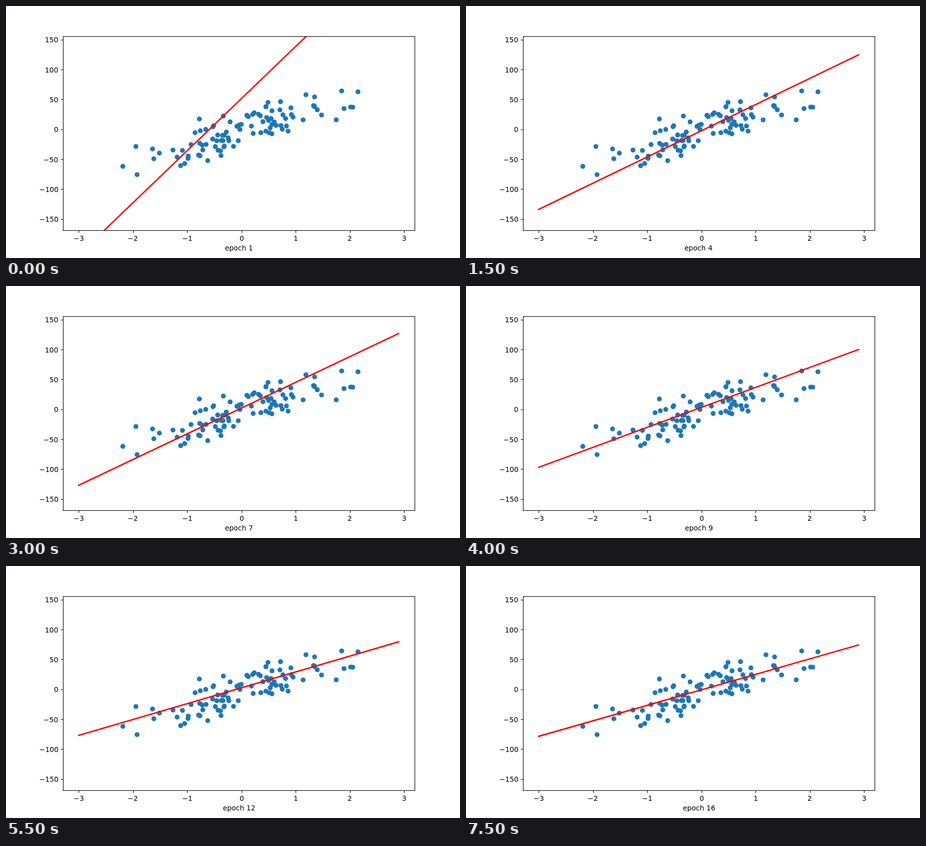
Animation, 900 px wide and 500 px high, one loop 8 s. Source, as an HTML page with a canvas:

```html
<!DOCTYPE html>
<html lang="en">
<head>
<meta charset="utf-8">
<title>Line fit by epoch</title>
<style>
  html, body { margin: 0; width: 100%; height: 100%; overflow: hidden; background: #fff; }
  canvas { display: block; }
</style>
</head>
<body>
<canvas id="plot" width="900" height="500"></canvas>
<script>
const ctx = document.getElementById("plot").getContext("2d");
const STEP = 500;
const EPOCHS = 16;
const SAMPLES = 100;
const NOISE = 20;
const box = { l: 113.5, t: 60.5, r: 810.5, b: 445.5 };

// Data ranges with a five percent margin
const toX = v => 112.5 + (v + 3.295) * 697.5 / 6.49;
const toY = v => 60 + (155.75 - v) * 385 / 324.5;
const snap = v => Math.floor(v + 0.5) + 0.5;

// Key epochs of the fit: epoch, slope, intercept
const keys = [
  [1, 87.1, 51.4], [2, 83.5, 41.6], [3, 70.7, 22], [4, 43.8, -2.4], [5, 42.8, -2.2],
  [7, 43, 2.1], [9, 33.4, 3.3], [10, 21.1, 3.5], [12, 26.5, 2.6], [16, 25.9, -0.8]
];

function fitAt(epoch) {
  const next = Math.max(1, keys.findIndex(k => k[0] >= epoch));
  const [e0, m0, b0] = keys[next - 1];
  const [e1, m1, b1] = keys[next];
  const p = (epoch - e0) / (e1 - e0);
  return { m: m0 + (m1 - m0) * p, b: b0 + (b1 - b0) * p };
}

// Mersenne Twister giving uniform numbers in [0, 1)
function twister(seed) {
  const N = 624, M = 397;
  const s = new Uint32Array(N);
  let pos = N;
  s[0] = seed;
  for (let i = 1; i < N; i++) {
    s[i] = Math.imul(1812433253, s[i - 1] ^ (s[i - 1] >>> 30)) + i;
  }
  function word() {
    if (pos === N) {
      for (let i = 0; i < N; i++) {
        const y = (s[i] & 0x80000000) | (s[(i + 1) % N] & 0x7fffffff);
        s[i] = s[(i + M) % N] ^ (y >>> 1) ^ (y & 1 ? 0x9908b0df : 0);
      }
      pos = 0;
    }
    let y = s[pos++];
    y ^= y >>> 11;
    y ^= (y << 7) & 0x9d2c5680;
    y ^= (y << 15) & 0xefc60000;
    y ^= y >>> 18;
    return y >>> 0;
  }
  return () => {
    const high = word() >>> 5;
    const low = word() >>> 6;
    return (high * 2 ** 26 + low) / 2 ** 53;
  };
}

// Polar method: normal numbers come in pairs
function gaussian(random) {
  let spare = null;
  return () => {
    if (spare !== null) {
      const value = spare;
      spare = null;
      return value;
    }
    let a, b, r;
    do {
      a = 2 * random() - 1;
      b = 2 * random() - 1;
      r = a * a + b * b;
    } while (r >= 1 || r === 0);
    const f = Math.sqrt(-2 * Math.log(r) / r);
    spare = f * a;
    return f * b;
  };
}

function makeSamples(seed) {
  const random = twister(seed);
  const normal = gaussian(random);
  const xs = Array.from({ length: SAMPLES }, normal);
  const slope = 100 * random();
  return xs.map(x => ({ x, y: slope * x + NOISE * normal() }));
}

const samples = makeSamples(13);

function segment(x1, y1, x2, y2) {
  ctx.beginPath();
  ctx.moveTo(x1, y1);
  ctx.lineTo(x2, y2);
  ctx.stroke();
}

// Places the inked part of the text: anchor 0.5 is centre, 1 is right
function label(text, x, y, anchor) {
  const ink = ctx.measureText(text);
  const left = -ink.actualBoundingBoxLeft;
  const width = ink.actualBoundingBoxRight - left;
  ctx.fillText(text, Math.round(x - width * anchor) - left, Math.round(y));
}

const signed = v => v < 0 ? "\u2212" + -v : String(v);

function drawDots() {
  ctx.fillStyle = "#1f77b4";
  for (const { x, y } of samples) {
    ctx.beginPath();
    ctx.arc(toX(x), toY(y), 4.86, 0, Math.PI * 2);
    ctx.fill();
  }
}

function drawFit({ m, b }) {
  ctx.save();
  ctx.beginPath();
  ctx.rect(box.l, box.t, box.r - box.l, box.b - box.t);
  ctx.clip();
  ctx.strokeStyle = "#f00";
  ctx.lineWidth = 2.78;
  ctx.lineCap = "square";
  segment(toX(-3), toY(b - 3 * m), toX(2.9), toY(b + 2.9 * m));
  ctx.restore();
}

function drawAxes() {
  ctx.strokeStyle = ctx.fillStyle = "#000";
  ctx.lineWidth = 1.11;
  ctx.font = '13.89px "DejaVu Sans", sans-serif';
  ctx.strokeRect(box.l, box.t, box.r - box.l, box.b - box.t);
  for (let v = -3; v <= 3; v++) {
    const x = toX(v);
    const y = toY(v * 50);
    segment(snap(x), box.b, snap(x), box.b + 4.86);
    segment(box.l, snap(y), box.l - 4.86, snap(y));
    label(signed(v), x, 466, 0.5);
    label(signed(v * 50), 102.8, y + 5.5, 1);
  }
}

let shown = -1;

function draw(index) {
  const epoch = index + 1;
  ctx.fillStyle = "#fff";
  ctx.fillRect(0, 0, 900, 500);
  drawDots();
  drawFit(fitAt(epoch));
  drawAxes();
  label("epoch " + epoch, 461.25, 485, 0.5);
}

const start = performance.now();

function tick(now) {
  const index = Math.floor(Math.max(0, now - start) / STEP) % EPOCHS;
  if (index !== shown) {
    shown = index;
    draw(index);
  }
  requestAnimationFrame(tick);
}
tick(start);
</script>
</body>
</html>
```
